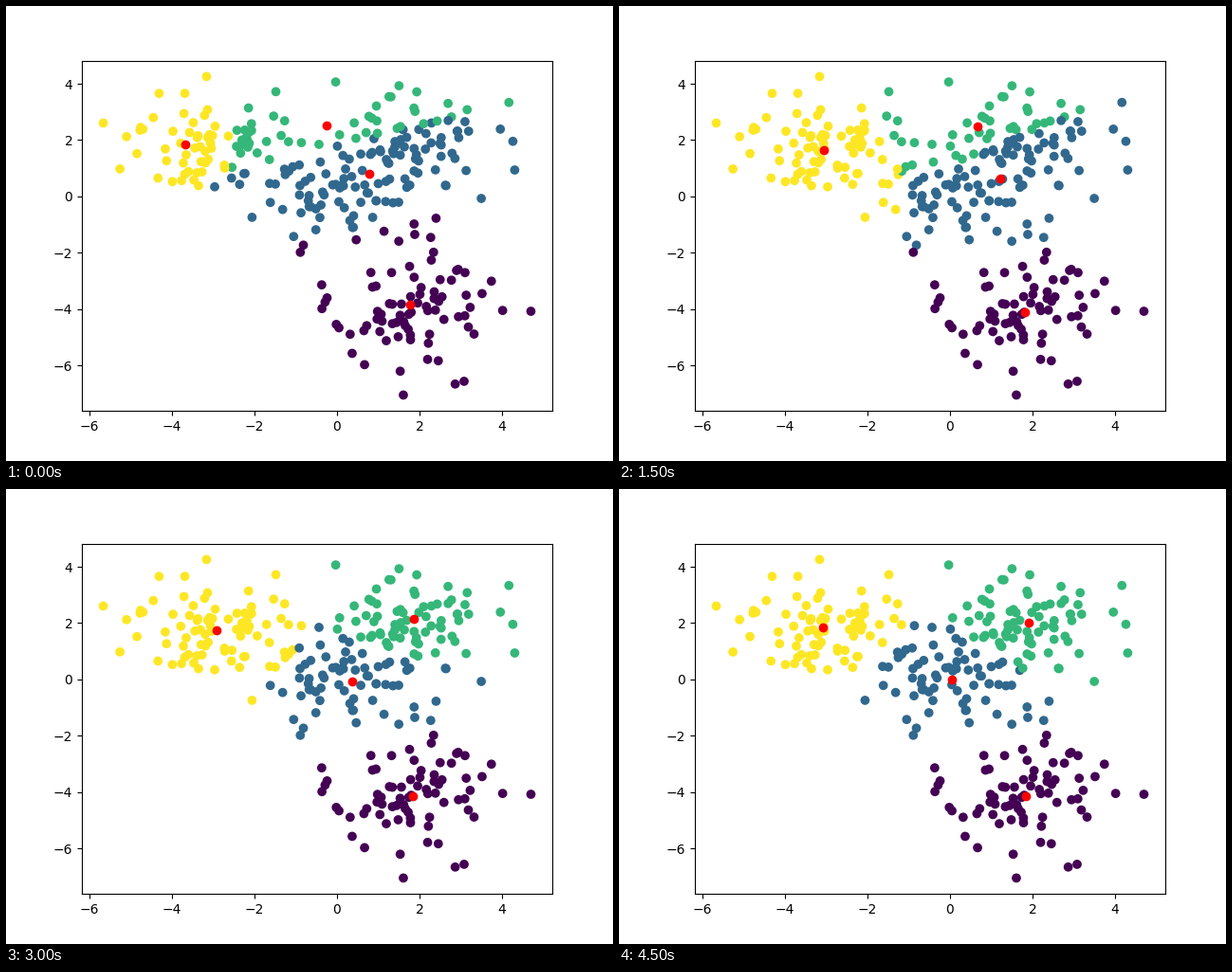
Recreate the animation shown at these times as a matplotlib script. Size 640x480 px, loop 5.5 s.

```python
import numpy as np
import matplotlib.pyplot as plt
from matplotlib.animation import FuncAnimation

STEP_MS = 500
STEPS = 10
HOLD = 1  # extra steps on the final state

BLOBS = np.array([[0, 0], [2, 2], [-3, 2], [2, -4]])
PER_BLOB = 75
SEEDS = np.array([[0.219, -3.033], [-0.749, 0.195],
                  [-1.597, 2.728], [-3.573, 2.728]])


def make_points():
    rng = np.random.RandomState(0)
    centers = np.repeat(BLOBS, PER_BLOB, axis=0)
    points = centers + rng.normal(size=centers.shape)
    return points[rng.permutation(len(points))]


def nearest(points, centers):
    gaps = points[:, None] - centers[None]
    return (gaps ** 2).sum(axis=2).argmin(axis=1)


def lloyd(points, centers, steps):
    """Labels and cluster means after each k-means step."""
    states = []
    for _ in range(steps):
        labels = nearest(points, centers)
        centers = np.array([points[labels == k].mean(axis=0)
                            for k in range(len(centers))])
        states.append((labels, centers))
    return states


points = make_points()
states = lloyd(points, SEEDS, STEPS)

fig, ax = plt.subplots(figsize=(6.4, 4.8), dpi=100)
labels, means = states[0]
dots = ax.scatter(*points.T, c=labels, cmap="viridis", vmin=0, vmax=3)
marks = ax.scatter(*means.T, c="r")


def update(i):
    labels, means = states[min(i, STEPS - 1)]
    dots.set_array(labels)
    marks.set_offsets(means)
    return dots, marks


anim = FuncAnimation(fig, update, frames=STEPS + HOLD,
                     interval=STEP_MS, repeat=True, repeat_delay=0)
plt.show()
```
